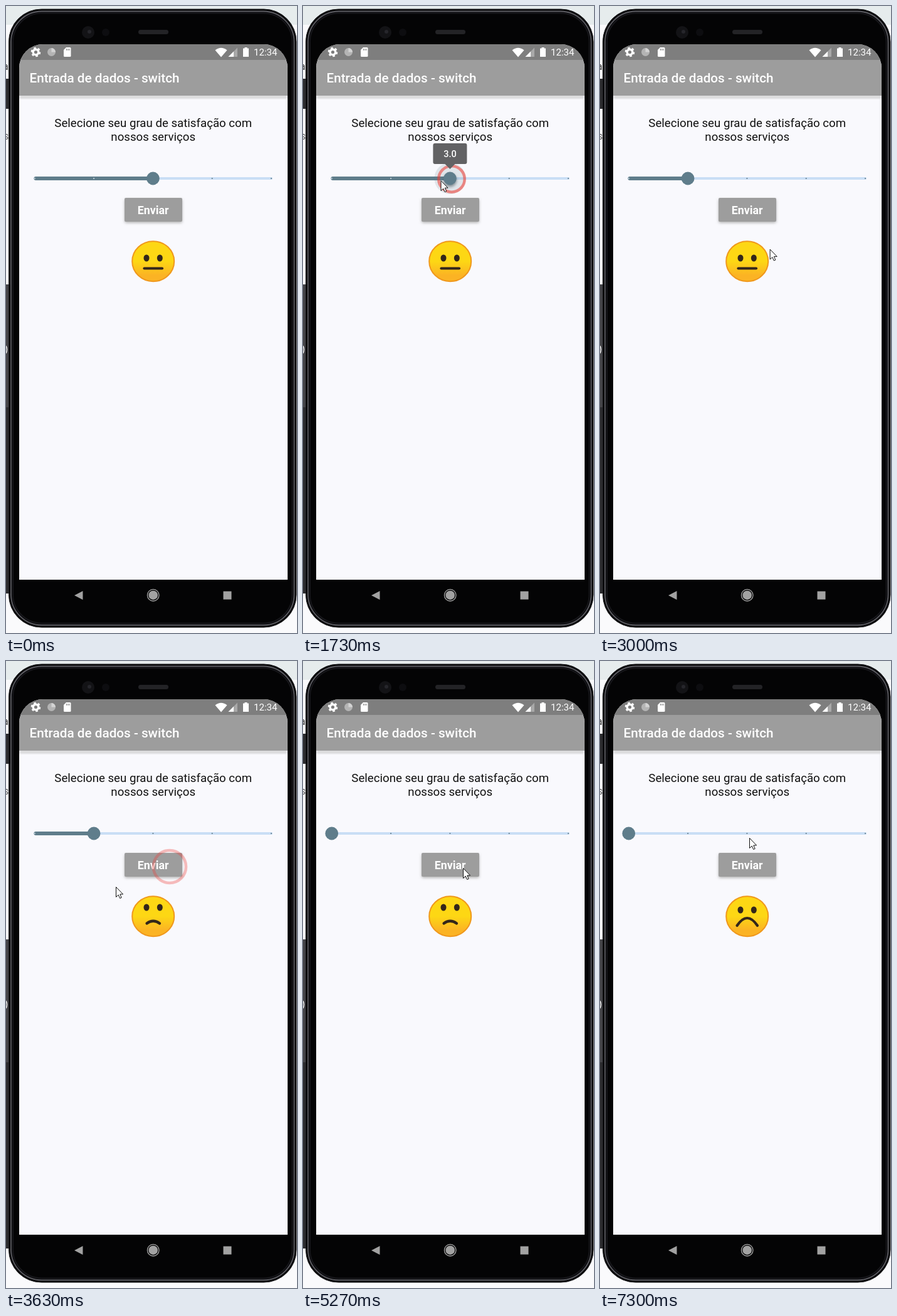
Write an HTML page that moves like this. It is 464 by 1000 pixels and loops after 8 s.

```html
<!DOCTYPE html>
<html lang="pt">
<head>
<meta charset="utf-8">
<title>Entrada de dados</title>
<style>
html, body { margin: 0; width: 100%; height: 100%; overflow: hidden; background: #fafafc }
svg { display: block; font-family: Roboto, sans-serif }
</style>
</head>
<body>
<svg width="464" height="1000" viewBox="0 0 464 1000">
  <defs>
    <linearGradient id="skin" x2="0" y2="1">
      <stop offset=".5" stop-color="#fdd714"/>
      <stop offset=".85" stop-color="#fbb324"/>
    </linearGradient>
    <filter id="blur" x="-50%" y="-50%" width="200%" height="200%"><feGaussianBlur stdDeviation="2"/></filter>
    <clipPath id="screen"><path d="M21 915V99A38 38 0 0 1 59 61H411A38 38 0 0 1 449 99V915Z"/></clipPath>
  </defs>

  <!-- desktop behind the phone -->
  <path d="M0 0H464V30H0Z" fill="#e6eced"/>
  <path d="M0 116H8V164H0Z" fill="#2b2b2e"/>
  <path d="M0 444H8V640H0Z" fill="#434347"/>
  <path d="M0 640H8V937H0Z" fill="#2b2b2e"/>
  <path d="M0 542Q3 548 0 554" fill="none" stroke="#f5f5f5" stroke-width="1.5"/>
  <text x="-5" y="102" font-size="16" fill="#333">a</text>
  <text x="-4" y="213" font-size="16" fill="#555">s</text>

  <!-- phone body -->
  <rect x="4.500" y="5" width="458.500" height="986" rx="52" fill="#060608" stroke="#1c1c1f"/>
  <rect x="8" y="8.500" width="451.500" height="979" rx="49" fill="none" stroke="#5c5c62" stroke-width="1.800"/>
  <rect x="11" y="11.500" width="445.500" height="973" rx="46" fill="#040405" stroke="#16161a" stroke-width="2"/>
  <circle cx="131" cy="42" r="10" fill="#131316"/>
  <circle cx="133" cy="41" r="3" fill="#26262b"/>
  <circle cx="159" cy="42" r="6" fill="#0d0d10"/>
  <rect x="211" y="38" width="48" height="7" rx="3.500" fill="#232326"/>

  <!-- app screen -->
  <g clip-path="url(#screen)">
    <path d="M21 61H449V915H21Z" fill="#f9f9fd"/>
    <path d="M21 143H449V147H21Z" fill="#c8c8c8" filter="url(#blur)"/>
    <path d="M21 61H449V143H21Z" fill="#9d9d9d"/>
    <path d="M21 61H449V86H21Z" fill="#7e7e7e"/>
  </g>
  <g fill="#fff">
    <circle cx="47.500" cy="73.500" r="4.300" fill="none" stroke="#fff" stroke-width="3.400"/>
    <circle cx="47.500" cy="73.500" r="6.700" fill="none" stroke="#fff" stroke-width="2.200" stroke-dasharray="3.500 3.516"/>
    <circle cx="72.500" cy="73.500" r="6.500" fill="#b4b4b4"/>
    <path d="M72.500 67A6.500 6.500 0 0 1 79 73.500L72.500 73.500Z" fill="#d4d4d4"/>
    <path d="M96 66H102Q103.500 66 103.500 67.500V79.500Q103.500 81 102 81H93.500Q92 81 92 79.500V70Z"/>
    <path d="M96.500 68V71M98.800 68V71M101 68V71" stroke="#7e7e7e"/>
    <path d="M333.500 70.500Q343 63 352.500 70.500L343 81.500Z"/>
    <path d="M369 66.500V81H354.500Z" fill="#a8a8a8"/>
    <path d="M363 72.500V81H354.500Z"/>
    <path d="M380.500 66H384.500V67.500H387V81H378V67.500H380.500Z"/>
    <text x="395" y="79" font-size="15.100">12:34</text>
    <text x="37.500" y="122" font-size="20.700" font-weight="500">Entrada de dados - switch</text>
  </g>
  <g font-size="18.670" text-anchor="middle" fill="#111">
    <text x="234.700" y="193">Selecione seu grau de satisfação com</text>
    <text x="234.700" y="214.500">nossos serviços</text>
  </g>

  <rect x="189" y="308" width="92" height="38" rx="3" fill="#b5b5b5" filter="url(#blur)"/>
  <rect x="189" y="306" width="92" height="38" rx="2" fill="#9d9d9d"/>
  <rect id="press" x="189" y="306" width="92" height="38" rx="2" fill="#fff"/>
  <text x="234.700" y="331.500" font-size="17.800" font-weight="700" text-anchor="middle" fill="#fff">Enviar</text>

  <ellipse cx="234.700" cy="407.200" rx="33.500" ry="32" fill="url(#skin)" stroke="#f0981c" stroke-width="2"/>
  <g fill="#33261a">
    <ellipse id="eyeL" cx="224" rx="4.500" ry="5.500"/>
    <ellipse id="eyeR" cx="245.300" rx="4.500" ry="5.500"/>
  </g>
  <path id="mouth" fill="none" stroke="#33261a" stroke-width="4.200" stroke-linecap="round"/>

  <!-- slider -->
  <path d="M46 275H423" stroke="#c9def5" stroke-width="4" stroke-linecap="round"/>
  <path id="active" stroke="#5f7d8b" stroke-width="6" stroke-linecap="round"/>
  <g id="ticks"></g>
  <g id="thumb">
    <circle id="halo" r="25" fill="#607d8b" opacity=".16"/>
    <circle id="shade" cy="3" r="10.500" fill="#44545c" filter="url(#blur)"/>
    <circle r="10.400" fill="#5f7d8b"/>
  </g>
  <circle id="ring" fill="none" stroke="#ee4038" stroke-width="4.500"/>
  <g id="bubble">
    <path d="M-24 -56H24Q27 -56 27 -53V-26Q27 -23 24 -23H8L0 -15L-8 -23H-24Q-27 -23 -27 -26V-53Q-27 -56 -24 -56Z" fill="#626264"/>
    <text y="-34" id="value" font-size="14.500" font-weight="500" text-anchor="middle" fill="#fff"></text>
  </g>

  <!-- navigation bar -->
  <g fill="#a2a2a2">
    <path d="M109 940L122.500 933V947Z"/>
    <circle cx="234.700" cy="939.700" r="7.300"/>
    <circle cx="234.700" cy="939.700" r="9.300" fill="none" stroke="#a2a2a2" stroke-width="1.300"/>
    <path d="M346.500 933.500H359.500V946.500H346.500Z"/>
  </g>
  <path id="cursor" d="M.5 .5V16.500L4.200 13L6.700 18.500L9.200 17.400L6.800 12H11.600Z" fill="#fff" stroke="#111"/>
</svg>
<script>
const $ = id => document.getElementById(id);
const set = (id, attrs) => { for (const k in attrs) $(id).setAttribute(k, attrs[k]); };
const LOOP = 8000;
const RING_TIME = 480;
const clamp = v => Math.max(0, Math.min(1, v));
const ramp = (t, from, to) => clamp((t - from) / (to - from));
const during = (t, start, end, fade = 100) => ramp(t, start, start + fade) * (1 - ramp(t, end, end + fade));
const knobX = v => 45.8 + 94.3 * (v - 1);

// pointer path: time, x, y
const path = [
  [270, 58, 310], [600, 254, 292], [1000, 231, 276], [1100, 231, 276], [1170, 237, 276],
  [1560, 237, 276], [2130, 156, 286], [2450, 156, 286], [2850, 277, 427], [3200, 261, 328],
  [3340, 261, 328], [3630, 175, 360], [4030, 148, 283], [4070, 148, 283], [4300, 134, 273],
  [4410, 134, 273], [4570, 46, 292], [4640, 42, 292], [4870, 209, 364], [5000, 209, 364],
  [5270, 255, 330], [5720, 255, 330], [6100, 247, 387], [6300, 247, 387], [6830, 38, 274],
  [7130, 38, 274], [7300, 238, 282]
];
function pointer(t) {
  const next = path.findIndex(p => p[0] > t);
  if (next < 1) return path.at(next).slice(1);
  const [a, b] = [path[next - 1], path[next]];
  const u = ramp(t, a[0], b[0]), ease = u * u * (3 - 2 * u);
  return [a[1] + (b[1] - a[1]) * ease, a[2] + (b[2] - a[2]) * ease];
}

const faces = [
  { eyes: 402, mouth: 'M220.500 418.500H249' },
  { eyes: 393, mouth: 'M224.500 418.500Q234.700 411 245 418.500' },
  { eyes: 397, mouth: 'M218.500 422Q234.700 398 251 422' }
];
const clicks = [1420, 3240, 4370, 5540];

$('ticks').innerHTML = [1, 2, 3, 4, 5].map(v => `<circle cx="${knobX(v)}" cy="275" r="1.100"/>`).join('');

function draw(t) {
  const rating = 3 - ramp(t, 1850, 1930) - ramp(t, 4600, 4680);
  const x = knobX(rating);
  const held = during(t, 1430, 2400) + during(t, 4390, 4700);
  set('active', { d: `M47.500 275H${Math.max(47.5, x)}`, opacity: rating > 1.02 ? 1 : 0 });
  [...$('ticks').children].forEach((dot, i) => dot.setAttribute('fill', i + 1 < rating ? '#c9d6dc' : '#66808e'));
  set('thumb', { transform: `translate(${x} 275)` });
  set('halo', { r: 25 * held });
  set('shade', { opacity: .6 * held });
  set('bubble', { transform: `translate(${x} 275) scale(${held})` });
  $('value').textContent = Math.round(rating).toFixed(1);

  const face = faces[(t >= 3370) + (t >= 5670)];
  set('eyeL', { cy: face.eyes });
  set('eyeR', { cy: face.eyes });
  set('mouth', { d: face.mouth });
  set('press', { opacity: .18 * (during(t, 3250, 3420) + during(t, 5550, 5720)) });

  // each click leaves a ring that grows and fades where it happened
  const click = clicks.findLast(c => c <= t) ?? -RING_TIME;
  const [cx, cy] = pointer(click);
  const age = ramp(t, click, click + RING_TIME);
  set('ring', { cx, cy, r: 32 * age, opacity: 1 - age * age });

  set('cursor', { transform: `translate(${pointer(t).join(' ')})`, opacity: t < 270 ? 0 : 1 });
}

const start = performance.now();
(function tick() {
  draw((performance.now() - start) % LOOP);
  requestAnimationFrame(tick);
})();
</script>
</body>
</html>
```
